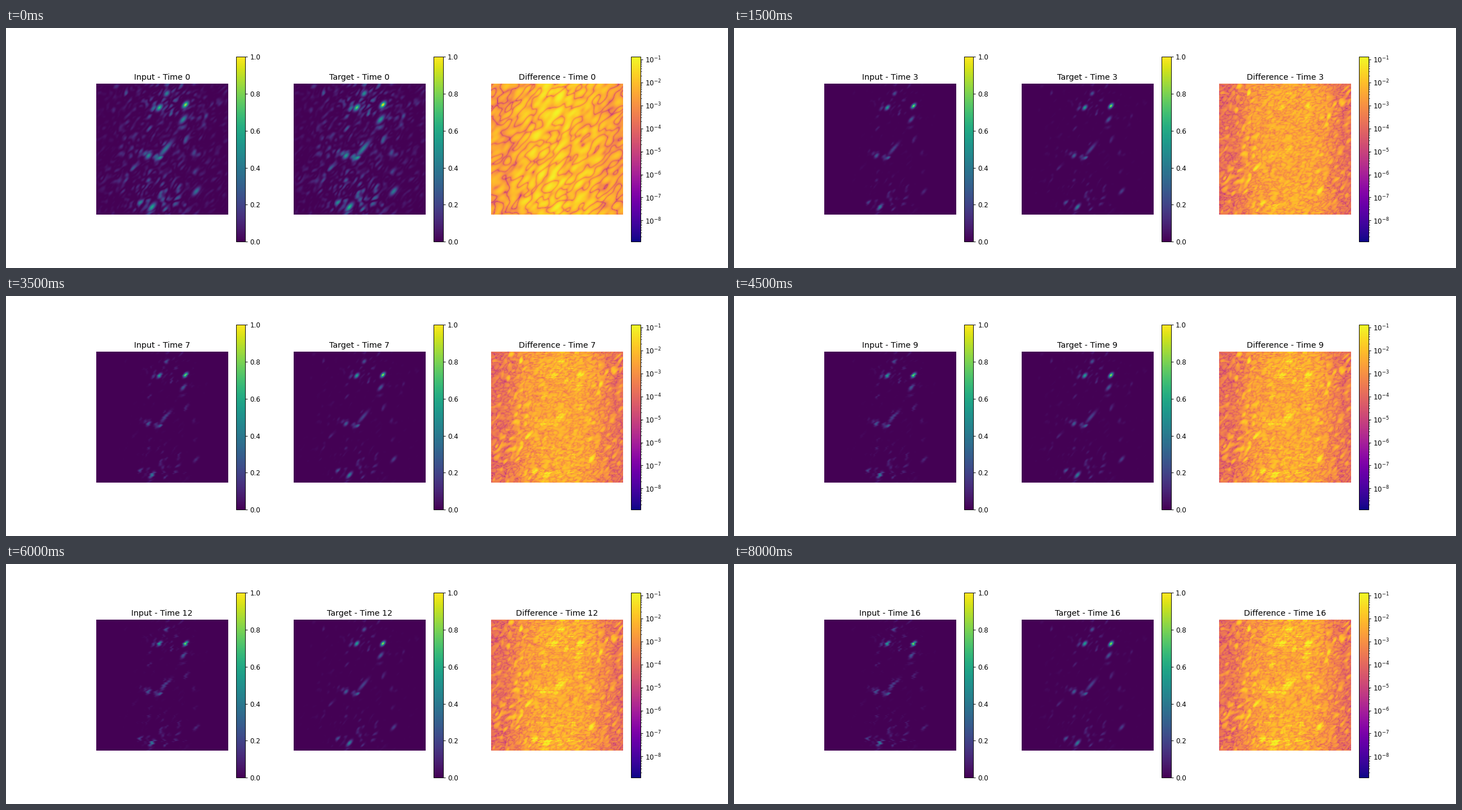
Write a matplotlib script that moves like this. It is 1280 px wide and 427 px high and loops after 8.5 s.

```python
import numpy as np
import matplotlib.pyplot as plt
from matplotlib.animation import FuncAnimation
from matplotlib.colors import LogNorm, Normalize

plt.rcParams["font.family"] = "DejaVu Sans"

DPI = 1280 / 15
STEPS = 17
N = 233
FLOOR, CEILING = 1.2e-9, .13
Y, X = np.mgrid[0:N, 0:N].astype(float)
U, V = X / (N - 1), Y / (N - 1)

# Brightest spots inside a panel: x, y, strength, length
PEAK = (157, 38, .97, 4.5)
SPOTS = [(111, 43, .78, 4.5), (153, 64, .52, 6), (124, 18, .5, 4),
         (92, 128, .55, 4.5), (122, 116, .45, 12), (98, 219, .66, 6),
         (176, 191, .42, 6)]


def rotated(x, y, angle=50):
    """Coordinates along and across a grain that rises to the right."""
    c, s = np.cos(np.radians(angle)), np.sin(np.radians(angle))
    return x * c - y * s, x * s + y * c


def field(seed, along, across, angle=48):
    """Unit-variance random field with slanted grain."""
    noise = np.random.default_rng(seed).normal(size=(N, N))
    freq = np.fft.fftfreq(N)
    u, v = rotated(freq[None, :], freq[:, None], angle)
    gain = np.exp(-2 * np.pi**2 * ((along * u) ** 2 + (across * v) ** 2))
    f = np.fft.ifft2(np.fft.fft2(noise) * gain).real
    return f / f.std()


def spot(x, y, strength, length, width=2.6):
    u, v = rotated(X - x, Y - y)
    return strength * np.exp(-((u / length) ** 2 + (v / width) ** 2) / 2)


def bump(center, width, power=2):
    return np.exp(-np.abs((U - center) / width) ** power)


def step_up(x, edge):
    return 1 / (1 + np.exp((edge - x) / 3))


# Speckle gathers in three bands down the middle
bands = .5 + .5 * np.cos(2 * np.pi * (V - .15) / .36)
middle = .58 - .16 * V
SPECKLE = field(3, 4.4, 2.1) ** 2 * (
    .006 + .03 * bump(middle, .34) + .03 * bands * bump(middle, .18))
SMOOTH_GAP = (np.abs(field(8, 6.5, 2.9, 45)) ** 1.5
              * 10 ** (-2.75 + 1.05 * bump(.52, .36)))
GRAIN = [.6 * field(20 + k, 3.4, 1.1, 0) + .8 * field(30 + k, 3.4, 1.6)
         for k in range(2)]
GRAIN_LEVEL = 10 ** (-3.75 + 1.4 * bump(.53, .36, 4))
WINDOW = .2 + .8 * step_up(X, 74) * (1 - step_up(X, 176))
ROW_SHIFT = np.random.default_rng(5).normal(size=N // 2 + 1).repeat(2)[:N]


def intensity(t):
    total = SPECKLE
    for x, y, strength, length in SPOTS:
        total = np.maximum(total, spot(x, y, strength, length))
    x, y, strength, length = PEAK
    sink = 6 * (1 - np.exp(-t / 7))
    return np.maximum(total, spot(x, y + sink, strength, length))


def panels(step):
    t = min(step, STEPS - 2)
    base = intensity(t)
    if t == 0:
        return .9 * base, base, SMOOTH_GAP
    target = .95 * base ** 1.9
    columns = np.arange(N)
    shifts = ROW_SHIFT * 1.6 * (t - 1) / (STEPS - 3)
    result = np.array([np.interp(columns + shift, columns, row)
                       for shift, row in zip(shifts, .96 * target * WINDOW)])
    phase = .07 * t
    grain = np.cos(phase) * GRAIN[0] + np.sin(phase) * GRAIN[1]
    return result, target, np.abs(target - result + GRAIN_LEVEL * grain)


fig, axes = plt.subplots(1, 3, figsize=(15, 427 / DPI), dpi=DPI)
NAMES = ["Input", "Target", "Difference"]
STYLES = [("viridis", Normalize(0, 1)), ("viridis", Normalize(0, 1)),
          ("plasma", LogNorm(FLOOR, CEILING))]
images = []
for ax, data, (cmap, norm) in zip(axes, panels(0), STYLES):
    images.append(ax.imshow(data, cmap=cmap, norm=norm))
    fig.colorbar(images[-1], ax=ax)
    ax.axis("off")


def update(step):
    for ax, image, name, data in zip(axes, images, NAMES, panels(step)):
        image.set_data(np.maximum(data, FLOOR))
        ax.set_title(f"{name} - Time {step}")
    return images


anim = FuncAnimation(fig, update, frames=STEPS, interval=500, repeat=True,
                     repeat_delay=0, blit=False)
plt.show()
```
